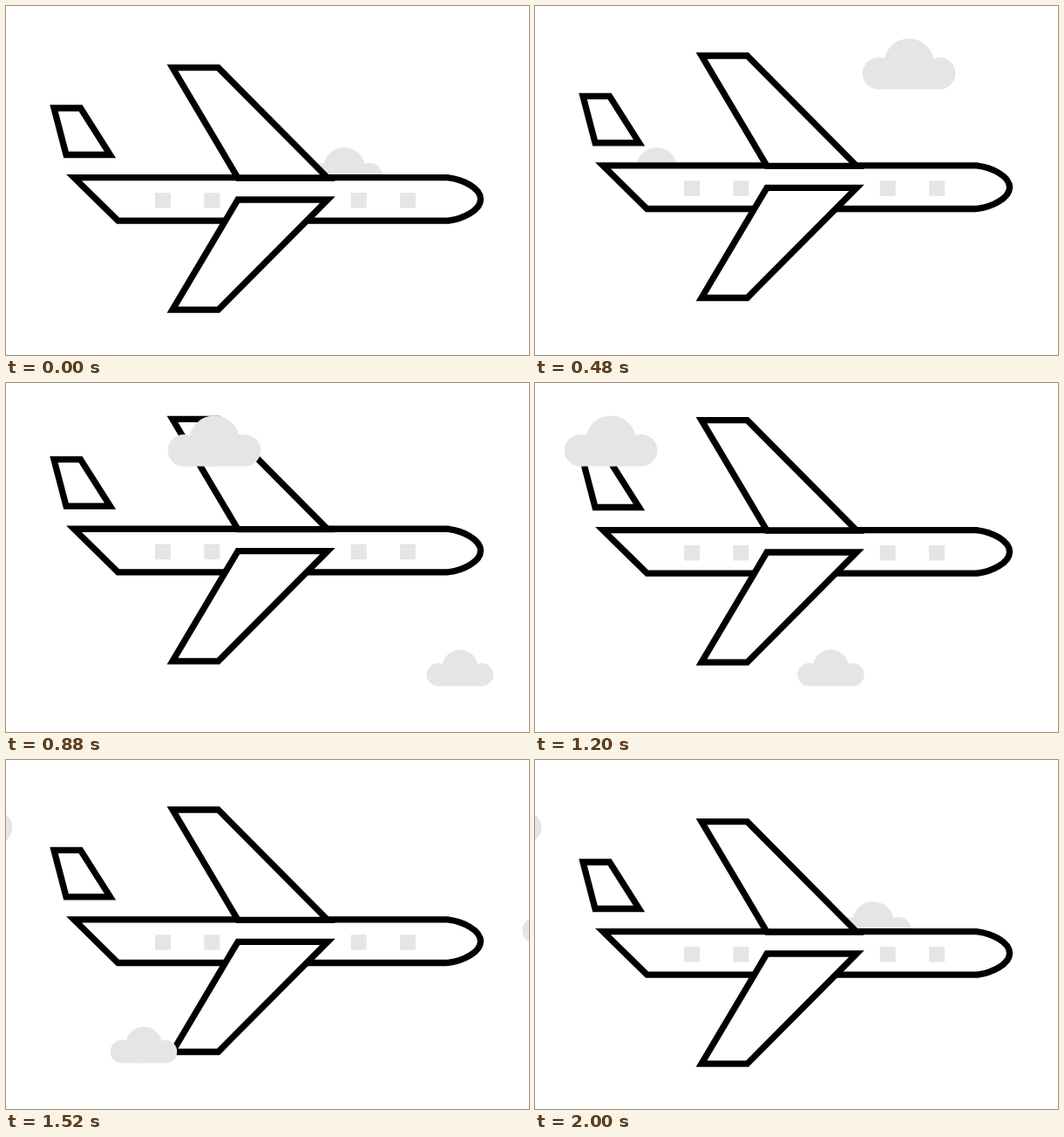
Write an HTML page that moves like this. It is 600x400 px and loops after 2.04 s.

```html
<!DOCTYPE html>
<html lang="en">
<head>
<meta charset="utf-8">
<title>Plane in the clouds</title>
<style>
html, body { margin: 0; width: 100%; height: 100%; overflow: hidden; background: #fff; }
svg { display: block; }
#plane { fill: #fff; stroke: #000; stroke-width: 7.3; stroke-miterlimit: 10; }
.soft { fill: #e5e5e5; stroke: none; }
</style>
</head>
<body>
<svg width="600" height="400" viewBox="0 0 600 400">
  <defs>
    <!-- origin: middle of the cloud's flat base -->
    <g id="cloud">
      <circle cy="-29.2" r="29"/>
      <circle cx="-35" cy="-18.3" r="18.3"/>
      <circle cx="35" cy="-18.3" r="18.3"/>
      <path d="M-35-18.3H35V0H-35z"/>
    </g>
  </defs>
  <use href="#cloud" class="soft" id="mid"/>
  <g id="plane">
    <path d="M55 117H85.5L119.5 170.5H69z"/>
    <path d="M78 196.6H506C524 198.2 544.5 209 544.5 221.5S524 244.6 506 246.2H128.5z"/>
    <path d="M191 70.7H243.5L369 197H266z"/>
    <path d="M266 222H369L243.5 348.2H191z"/>
    <path class="soft" d="M171 214h18v17.5h-18zM227.3 214h18v17.5h-18zM395.7 214h18v17.5h-18zM452 214h18v17.5h-18z"/>
  </g>
  <use href="#cloud" class="soft" id="low"/>
  <use href="#cloud" class="soft" id="high"/>
</svg>
<script>
const STEP = 40, LOOP = 2040, CYCLE = 2000;

const move = (id, x, y, scale = 1) =>
  document.getElementById(id).setAttribute('transform', `translate(${x} ${y}) scale(${scale})`);

const easeInOut = u => u < .5 ? (2 * u) ** 2.2 / 2 : 1 - (2 - 2 * u) ** 2.2 / 2;

function draw(now) {
  const t = Math.floor(now % LOOP / STEP) * STEP;
  const rise = 1 - Math.abs(1 - t / (CYCLE / 2));
  move('plane', 0, -30 * easeInOut(rise));
  // the middle cloud re-enters from the right in the second half
  move('mid', 388 - .5175 * (t > 1200 ? t - CYCLE : t), 210.3, .825);
  move('low', 1019.8 - .567 * t, 347.4, .718);
  // the top cloud halts with its edge still showing
  move('high', Math.max(-46, 657 - .475 * t), 95.6);
}

const start = performance.now();
function tick() {
  draw(performance.now() - start);
  requestAnimationFrame(tick);
}
tick();
</script>
</body>
</html>
```
